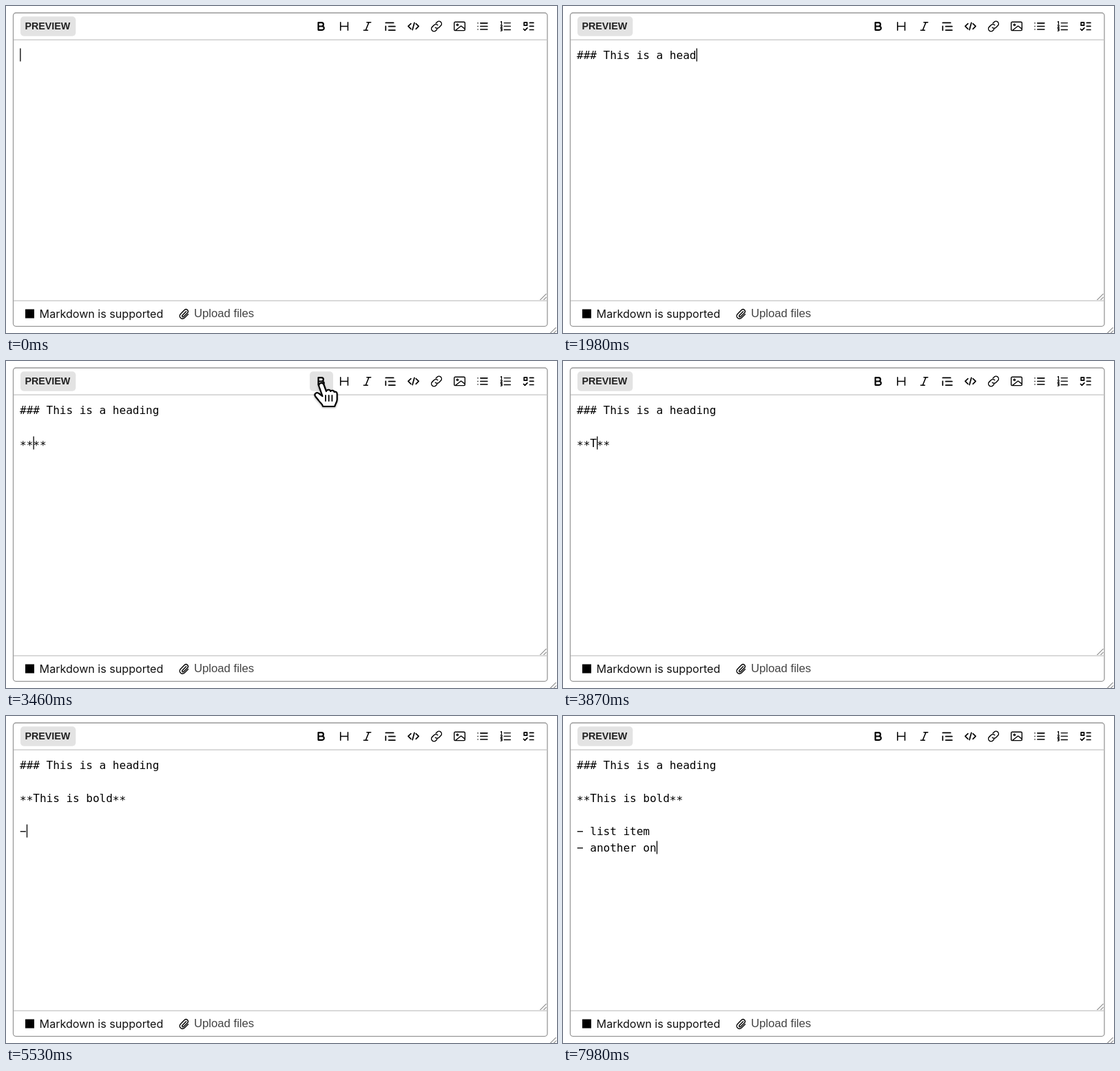
These frames come from a looping animation (800 by 475 pixels, 8 s). An HTML page:

```html
<!DOCTYPE html>
<html lang="en">
<head>
<meta charset="utf-8">
<title>Markdown editor</title>
<style>
  html, body { margin: 0; width: 100%; height: 100%; overflow: hidden; background: #fff; }
  svg { display: block; width: 800px; height: 475px; }
  .line { fill: none; stroke: #000; stroke-width: 1.45; stroke-linecap: round; stroke-linejoin: round; }
  .grip { fill: none; stroke: #555; stroke-width: 1; }
  #copy { font: 16px "DejaVu Sans Mono", monospace; white-space: pre; }
  .star { baseline-shift: -3px; }
  .sans { font-family: "Liberation Sans", Arial, sans-serif; }
  .inter { font-family: Inter, sans-serif; }
</style>
</head>
<body>
<svg viewBox="0 0 800 475" xmlns="http://www.w3.org/2000/svg">
  <rect x="10.5" y="10" width="775.5" height="455.3" rx="4" fill="#fff" stroke="#999" stroke-width="1.3"/>
  <path d="M11 49.2H786M11 428.2H786" stroke="#c4c4c4" stroke-width="1.2"/>
  <rect x="21" y="15.3" width="80.3" height="28.4" rx="5" fill="#e3e3e3"/>
  <text class="sans" x="27.4" y="34.4" font-size="14.3" font-weight="700" fill="#222">PREVIEW</text>
  <rect id="hover" x="441" y="15.3" width="34" height="28.4" rx="5" fill="#e3e3e3"/>
  <g id="tools" class="line"></g>

  <rect x="28" y="440.5" width="13" height="13"/>
  <text class="inter" x="48.6" y="452.6" font-size="16.1" fill="#111">Markdown is supported</text>
  <path class="line" transform="translate(250.4 438.6)"
    d="M11.2 5.2 5.6 10.8a1.3 1.3 0 0 0 1.9 1.9l5.8-5.8a3 3 0 0 0-4.2-4.2L3 8.8a4 4 0 0 0 5.7 5.7L14 9.2"/>
  <text class="sans" x="273" y="452.4" font-size="16.7" fill="#444">Upload files</text>
  <path class="grip" d="M775.5 427l9-9M780.5 427l4-4M790 475.5l8.5-8.5M795 475.5l4-4"/>

  <text id="copy"></text>
  <rect id="caret" width="1.3" height="19"/>

  <g id="mouse" fill="#fff" stroke="#000" stroke-linejoin="round" stroke-linecap="round"
     style="filter: drop-shadow(0 1.5px 1.5px rgba(0,0,0,.35))">
    <path id="arrow" d="M0 0V34L7.5 27 13 39 18.5 36.6 13.3 25H24Z" fill="#000" stroke="#fff" stroke-width="2.4"/>
    <g id="hand" transform="translate(-457 -33)" stroke-width="2.2">
      <path d="M459.5 51 454.5 37c-1.5-5 5-7 7-2.5L465 44c1-3 5.5-3 6.2 0 1.5-2 5-1.5 5.5 1 2-1 4 .5 4 3v8c0 4-2.5 6-3.5 10h-17c-1-4-4-5-6.5-9l-4.5-5.5c-2.5-4 2-7 5.5-4z"/>
      <path d="M464 50v8M468.7 50v8M473.4 50v8" fill="none" stroke-width="1.8"/>
    </g>
  </g>
</svg>
<script>
const LOOP = 8000, CHAR = 9.632, LEFT = 20, LINE = 24;
const $ = id => document.getElementById(id);

// Toolbar icons on a 16-unit grid, left to right.
const dot = (x, y) => `M${x} ${y}h.01`;
const rows = (x, ys) => ys.map(y => `M${x} ${y}H14.4`).join("");
const icons = [
  ["M4.2 3h4.4a2.4 2.4 0 0 1 0 5H4.2zM4.2 8h5.2a2.5 2.5 0 0 1 0 5H4.2z", 2],
  ["M3 2.6v10.8M13 2.6v10.8M3 8h10"],
  ["M7.4 2.6h5.4M3.2 13.4h5.4M10.2 2.6 5.8 13.4"],
  ["M1.7 3.3h10.6M1.7 7.8v5.6" + rows(5.8, [8.2, 13.2]), 1.6],
  ["M4.6 4.4 .9 8l3.7 3.6M11.4 4.4 15.1 8l-3.7 3.6M9.3 3.2 6.7 12.8", 1.6],
  ["M7.2 3.9l1.7-1.7a3.5 3.5 0 0 1 4.95 4.95l-2.5 2.5a3.5 3.5 0 0 1-4.95 0" +
   "M8.8 12.1l-1.7 1.7a3.5 3.5 0 0 1-4.95-4.95l2.5-2.5a3.5 3.5 0 0 1 4.95 0", 1.35],
  ["M2 2.2h12a1.3 1.3 0 0 1 1.3 1.3v9a1.3 1.3 0 0 1-1.3 1.3H2a1.3 1.3 0 0 1-1.3-1.3v-9A1.3 1.3 0 0 1 2 2.2z" +
   "M4 6a1.1 1.1 0 0 1 2.2 0A1.1 1.1 0 0 1 4 6M2.6 13.4 10 7.6l5 3.8", 1.3],
  [dot(1.5, 3.7) + dot(1.5, 8) + dot(1.5, 12.3) + rows(5, [3.7, 8, 12.3]), 1.5],
  ["M1.3 2 2.3 1.5v3.6M1.2 6.7c1-.9 2.3 0 1.6 1L1.2 9.6h2M1.2 11.3h1.9l-1 1.2c1.6 0 1.4 2-.9 1.7" +
   rows(5.8, [3.4, 8, 12.7]), 1.2],
  ["M1.6 2.8h4v4h-4zM1 11.8l1.7 1.8 3.3-3.4" + rows(9.3, [3.3, 8, 12.7]), 1.6]
];
$("tools").innerHTML = icons.map(([d, w = 1.45], i) =>
  `<path transform="translate(${449 + i * 33.5} 20.9) scale(1.07)" d="${d}" stroke-width="${w}"/>`).join("");

// Editing script: each step stores the text around the caret.
const steps = [{ at: 0, before: "", after: "", on: true }];
const last = () => steps[steps.length - 1];
const step = (at, change) => steps.push({ ...last(), on: true, at, ...change });
const off = at => step(at, { on: false });
const type = (from, to, text) => [...text].forEach((c, i, all) =>
  step(from + (to - from) * i / Math.max(1, all.length - 1), { before: last().before + c }));
const right = at => step(at, { before: last().before + last().after[0], after: last().after.slice(1) });

off(270);
type(410, 500, "##");
type(640, 770, "# ");
type(910, 1260, "This ");
type(1335, 1630, "is a ");
type(1770, 2100, "heading");
type(2320, 2410, "\n\n");
off(2730);
step(3090);
step(3420, { before: last().before + "**", after: "**" });
off(3780);
type(3870, 4330, "This is ");
type(4510, 4680, "bold");
off(5050);
right(5110);
right(5170);
type(5240, 5300, "\n\n");
type(5530, 5530, "-");
type(5760, 5760, " ");
type(6020, 6330, "list ");
type(6410, 6610, "item");
off(6980);
step(7050, { before: last().before + "\n- " });
type(7340, 7430, "an");
type(7570, 7980, "other on");

const markup = (text, i) => `<tspan x="${LEFT}" y="${77 + i * LINE}">` +
  text.replace(/^-/, "\u2212").replace(/\*+/g, s => `<tspan class="star">${s}</tspan>`) + "</tspan>";

let shown = null;
function drawText(t) {
  const now = steps.findLast(s => s.at <= t);
  if (now === shown) return;
  shown = now;
  $("copy").innerHTML = (now.before + now.after).split("\n").map(markup).join("");
  const lines = now.before.split("\n");
  $("caret").setAttribute("x", LEFT + 0.2 + lines[lines.length - 1].length * CHAR);
  $("caret").setAttribute("y", 61.5 + (lines.length - 1) * LINE);
  show("caret", now.on);
}

const show = (id, on) => $(id).setAttribute("visibility", on ? "visible" : "hidden");
const clamp = v => Math.min(1, Math.max(0, v));
const smooth = v => v * v * (3 - 2 * v);

function drawMouse(t) {
  const visible = t >= 3050 && t < 3830;
  const inward = 1 - (1 - clamp((t - 3050) / 330)) ** 2;
  const away = smooth(clamp((t - 3590) / 230));
  const x = 434 + 23 * inward - 10 * away;
  const y = -33 + 66 * inward - 78 * away;
  const over = visible && y > 15;
  $("mouse").setAttribute("transform", `translate(${x} ${y})`);
  show("hover", over);
  show("hand", over);
  show("arrow", visible && !over);
}

function frame() {
  const t = performance.now() % LOOP;
  drawText(t);
  drawMouse(t);
  requestAnimationFrame(frame);
}
frame();
</script>
</body>
</html>
```
